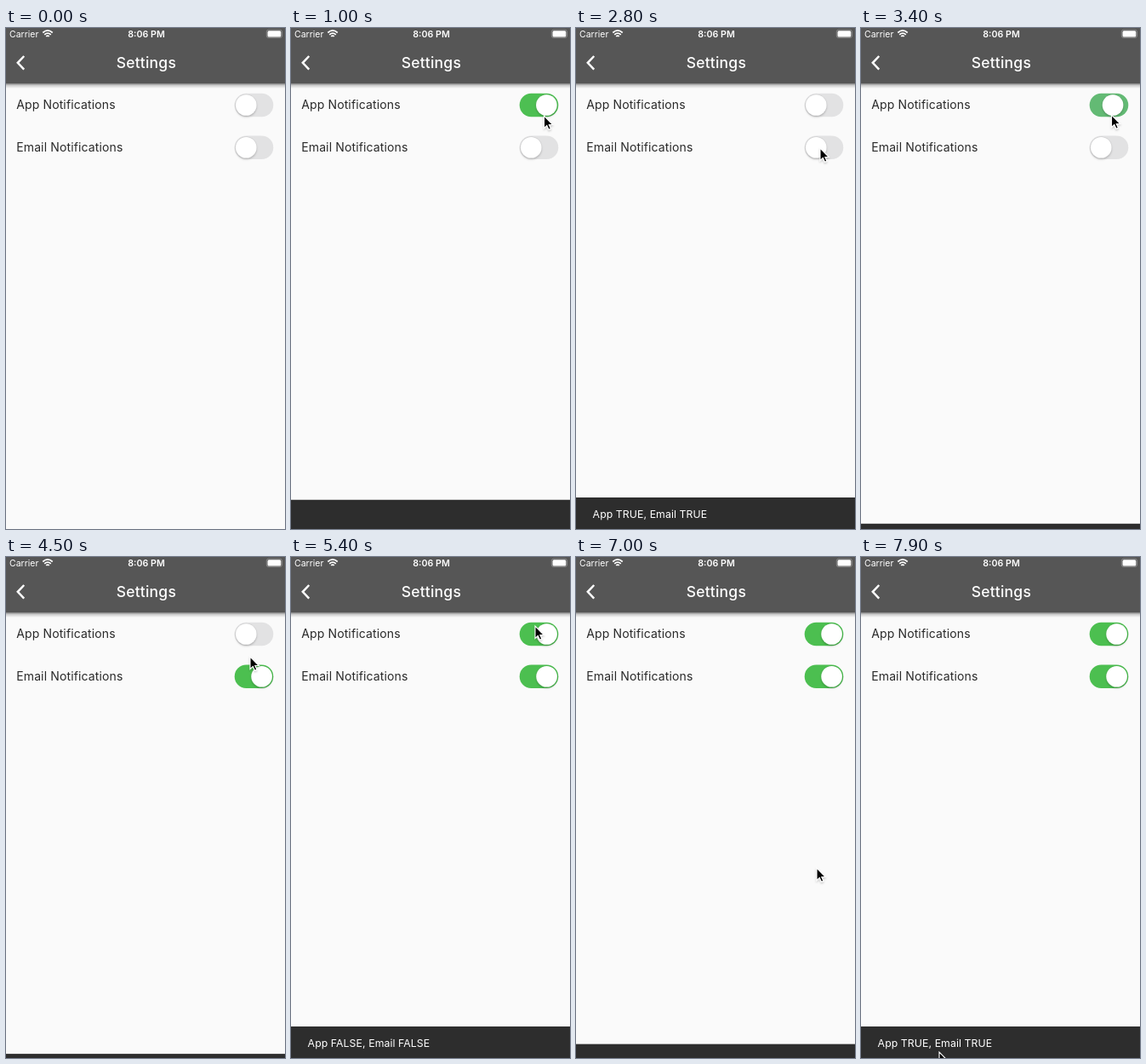
An HTML page for the animation above (8000 ms loop, 328 px wide and 588 px high).

```html
<!DOCTYPE html>
<html lang="en">
<head>
<meta charset="utf-8">
<title>Settings</title>
<style>
  html, body { margin: 0; width: 100%; height: 100%; overflow: hidden; background: #fafafa; }
  svg { display: block; width: 100vw; height: 100vh; font-family: Inter, Roboto, sans-serif; }
</style>
</head>
<body>
<svg viewBox="0 0 328 588">
  <defs>
    <linearGradient id="shade" x2="0" y2="1">
      <stop offset="0" stop-opacity=".5"/>
      <stop offset=".4" stop-opacity=".18"/>
      <stop offset="1" stop-opacity="0"/>
    </linearGradient>
    <filter id="soft" x="-30%" y="-30%" width="160%" height="170%">
      <feDropShadow dx="0" dy="1.5" stdDeviation="1.2" flood-opacity=".22"/>
    </filter>
    <g id="knob">
      <circle r="12.7" fill="#000" fill-opacity=".1"/>
      <circle r="12.3" fill="#fff" filter="url(#soft)"/>
    </g>
    <rect id="track" x="268.7" y="-13.7" width="45.6" height="27.4" rx="13.7"/>
  </defs>

  <rect width="328" height="588" fill="#fafafa"/>
  <rect y="65" width="328" height="6" fill="url(#shade)"/>
  <rect width="328" height="65" fill="#565656"/>

  <g fill="#fff">
    <text x="4" y="10.8" font-size="10.5">Carrier</text>
    <text x="165" y="11" font-size="10.7" font-weight="600" text-anchor="middle">8:06 PM</text>
    <text x="164.9" y="47" font-size="17.5" font-weight="500" letter-spacing=".2" text-anchor="middle">Settings</text>
    <rect x="307.5" y="3.2" width="15.8" height="7.2" rx="1.5"/>
  </g>
  <g fill="none" stroke="#fff">
    <rect x="306.3" y="2.1" width="18.2" height="9.4" rx="2.4" stroke-width=".8" opacity=".35"/>
    <path d="M43.3 5.5Q49 .4 54.7 5.5M45.2 7.8Q49 4.4 52.8 7.8M47.2 9.9Q49 8.4 50.8 9.9" stroke-width="1.7"/>
    <path d="M21.2 33L13.8 40.8L21.2 48.6" stroke-width="2.5"/>
  </g>

  <g fill="#2a2a2a" font-size="14" letter-spacing=".13">
    <text x="12.2" y="95.4">App Notifications</text>
    <text x="12.2" y="145.2">Email Notifications</text>
  </g>
  <g id="app" transform="translate(0 90.5)"><use href="#track"/><use href="#knob"/></g>
  <g id="email" transform="translate(0 140.2)"><use href="#track"/><use href="#knob"/></g>

  <g id="bar">
    <rect y="551" width="328" height="38" fill="#2d2d2d"/>
    <text x="19.6" y="575.2" font-size="12.25" letter-spacing=".09" fill="#fff"></text>
  </g>
  <path id="cursor" d="M0 0V14.4L3.3 11.4L5.5 16.3L7.9 15.3L5.8 10.5H10.3Z" stroke="#fff" stroke-width="1.1" filter="url(#soft)"/>
</svg>
<script>
const LOOP = 8000, STEP = 100, BAR_H = 37, SLIDE = 180, FLIP = 160, GLIDE = 250;
const $ = id => document.getElementById(id);
const clamp = x => Math.max(0, Math.min(1, x));
const ease = x => (x = clamp(x), x * x * (3 - 2 * x));
const mix = (a, b, k) => a + (b - a) * k;

// Each tap flips one switch and queues one message
const taps = [
  [850, 'app'], [1700, 'email'], [2130, 'app'], [2450, 'email'],
  [3292, 'app'], [3830, 'email'], [4200, 'app'], [5190, 'app'],
];
const state = { app: false, email: false };
const messages = taps.map(([, id]) => {
  state[id] = !state[id];
  return `App ${state.app}, Email ${state.email}`.replace(/true|false/g, s => s.toUpperCase());
});
// Queued messages follow each other at an even pace
const showTime = i => i ? 977 + 1188 * i : taps[0][0];

// Pointer glides: departure time, destination
const entry = [322, 119];
const glides = [
  [370, 295, 95], [750, 297.5, 103], [1450, 289, 139], [1690, 290, 97], [1950, 279, 152],
  [2260, 287, 141], [2850, 294.5, 102], [3700, 290, 138], [4050, 288, 96], [4250, 287, 117],
  [4600, 287, 81], [6150, 283, 365], [7430, 70, 574], [7650, 92, 581],
];

function drawSwitch(id, t) {
  const on = taps.filter(tap => tap[1] === id)
    .reduce((sum, [start], i) => sum + (i % 2 ? -1 : 1) * ease((t - start) / FLIP), 0);
  const dull = 20 * Math.sin(Math.PI * on);
  const [track, knob] = $(id).children;
  track.setAttribute('fill', `rgb(${mix(226, 76, on) - dull},${mix(226, 191, on) - dull},${mix(227, 80, on)})`);
  knob.setAttribute('x', mix(282.3, 300.6, on));
}

function drawBar(t) {
  const i = messages.findLastIndex((_, n) => t >= showTime(n));
  $('bar').style.display = i < 0 ? 'none' : '';
  if (i < 0) return;
  const age = t - showTime(i), left = showTime(i + 1) - t;
  const height = BAR_H * ease(Math.min(age, left) / SLIDE);
  const text = $('bar').lastElementChild;
  $('bar').setAttribute('transform', `translate(0 ${BAR_H - height})`);
  text.textContent = messages[i];
  text.setAttribute('opacity', Math.min(clamp((age - 150) / 110), clamp((left - 130) / 50)));
}

function drawCursor(t) {
  let [x, y] = entry;
  for (const [start, toX, toY] of glides) {
    const k = ease((t - start) / GLIDE);
    x = mix(x, toX, k);
    y = mix(y, toY, k);
  }
  $('cursor').style.display = t < glides[0][0] ? 'none' : '';
  $('cursor').setAttribute('transform', `translate(${x} ${y})`);
}

function draw(now) {
  const t = Math.floor(now % LOOP / STEP) * STEP;
  drawSwitch('app', t);
  drawSwitch('email', t);
  drawBar(t);
  drawCursor(t);
}

let began;
function tick(now) {
  began ??= now;
  draw(now - began);
  requestAnimationFrame(tick);
}
requestAnimationFrame(tick);
</script>
</body>
</html>
```
